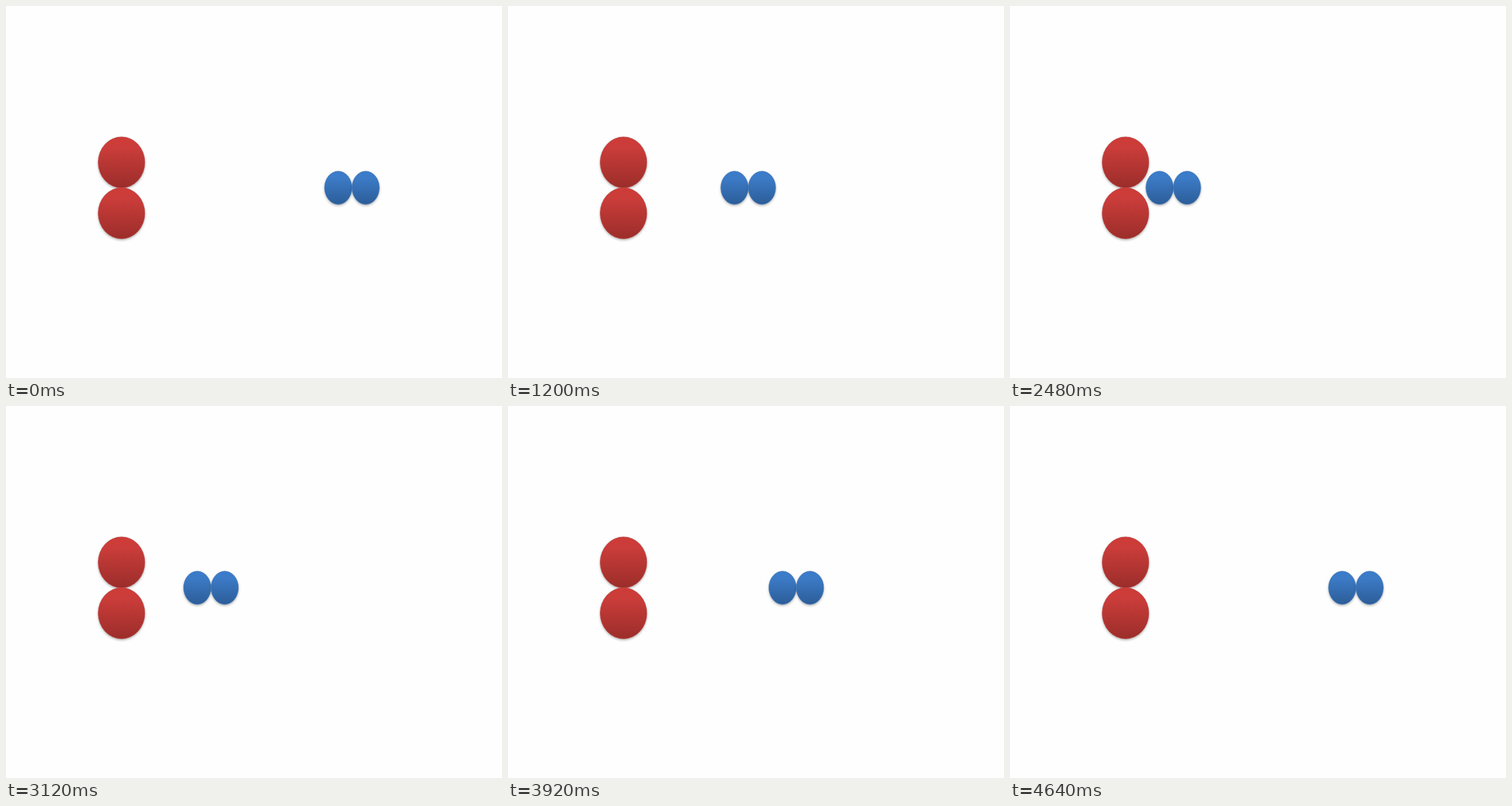
Recreate the animation shown at these times as an HTML page with a canvas. Size 864x648 px, loop 4720 ms.

```html
<!DOCTYPE html>
<html lang="en">
<head>
<meta charset="utf-8">
<title>Molecule collision</title>
<style>
  html, body { margin: 0; width: 100%; height: 100%; overflow: hidden; background: #fefefe; }
  canvas { display: block; }
</style>
</head>
<body>
<canvas id="stage" width="864" height="648"></canvas>
<script>
const ctx = document.getElementById("stage").getContext("2d");

const TICK = 80;
const LOOP = 4720;
const STEP = 5.58; // pixels per motion step

const RED = { top: "#ce3b37", mid: "#cb3d3a", bottom: "#9b2d2a", line: "#be4b48" };
const BLUE = { top: "#3a7ccb", mid: "#3c7bc7", bottom: "#2c5d98", line: "#4a7ebb" };

// [tick, steps travelled to the left]
const PATH = [
  [0, 0], [7, 15], [9, 18], [14, 30], [15, 33], [21, 45], [24, 50], [29, 60],
  [33, 53], [34, 53], [39, 44], [41, 38], [48, 21], [49, 18], [55, 7], [58, 0]
];

function travel(tick) {
  const i = Math.max(1, PATH.findIndex(([t]) => t >= tick));
  const [t0, s0] = PATH[i - 1];
  const [t1, s1] = PATH[i];
  return Math.round(s0 + (s1 - s0) * (tick - t0) / (t1 - t0)) * STEP;
}

function ball(x, y, rx, ry, color) {
  const fill = ctx.createLinearGradient(0, y - ry, 0, y + ry);
  fill.addColorStop(0, color.top);
  fill.addColorStop(0.2, color.mid);
  fill.addColorStop(1, color.bottom);

  ctx.beginPath();
  ctx.ellipse(x, y, rx, ry, 0, 0, Math.PI * 2);
  ctx.save();
  ctx.shadowColor = "rgba(0, 0, 0, 0.35)";
  ctx.shadowBlur = 4;
  ctx.shadowOffsetY = 2;
  ctx.fillStyle = fill;
  ctx.fill();
  ctx.restore();
  ctx.strokeStyle = color.line;
  ctx.lineWidth = 0.9;
  ctx.stroke();
}

function draw(now) {
  const shift = travel(Math.floor((now % LOOP) / TICK));
  ctx.fillStyle = "#fefefe";
  ctx.fillRect(0, 0, 864, 648);
  ball(201.2, 272.4, 40.6, 44.4, RED);
  ball(201.2, 361, 40.6, 44.4, RED);
  ball(578.7 - shift, 316.6, 23.8, 28.8, BLUE);
  ball(626.5 - shift, 316.6, 23.8, 28.8, BLUE);
}

let start;
function run(now) {
  start ??= now;
  draw(now - start);
  requestAnimationFrame(run);
}
draw(0);
requestAnimationFrame(run);
</script>
</body>
</html>
```
